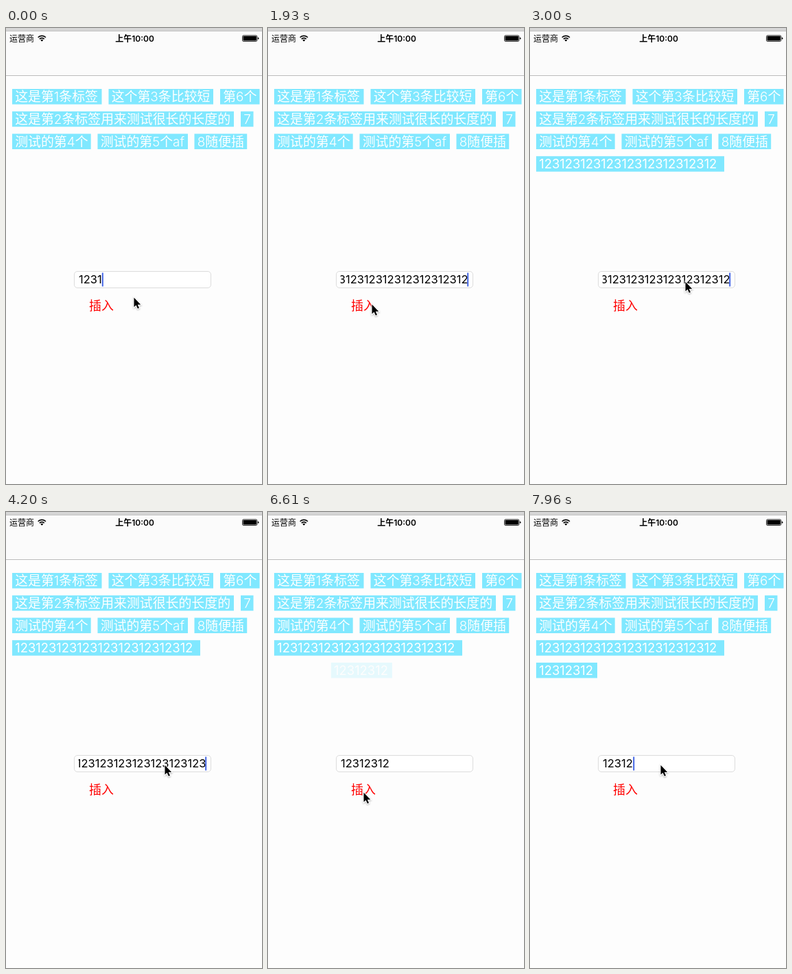
Animation, 373 px wide and 666 px high, one loop 8000 ms. Source, as an HTML page:

```html
<!DOCTYPE html>
<html lang="zh-CN">
<head>
<meta charset="utf-8">
<style>
html, body { margin: 0; width: 100%; height: 100%; overflow: hidden; background: #fdfdfd; }
svg { display: block; width: 373px; height: 666px; font-family: Inter, "Noto Sans CJK SC", "Noto Sans CJK", sans-serif; }
text { white-space: pre; }
.tag rect { fill: #80e8ff; }
.tag text { fill: #fff; font-size: 18.9px; font-weight: 300; }
.tag .digits { font-size: 18.4px; font-weight: 400; }
</style>
</head>
<body>
<svg viewBox="0 0 373 666">
  <defs>
    <clipPath id="fieldClip"><rect x="105.7" y="356" width="187" height="23"/></clipPath>
    <filter id="shadow" x="-50%" y="-50%" width="200%" height="200%">
      <feDropShadow dx="0" dy="1" stdDeviation="0.9" flood-color="#000" flood-opacity="0.35"/>
    </filter>
  </defs>
  <rect width="373" height="666" fill="#fdfdfd"/>
  <rect width="373" height="69" fill="#fbfbfb"/>
  <rect width="373" height="4" fill="#d6d6d6"/>
  <rect y="4" width="373" height="1" fill="#c2c2c2"/>
  <rect y="69" width="373" height="1" fill="#bcbcbc"/>

  <text x="5" y="19.5" font-size="12">运营商</text>
  <g fill="none" stroke="#000" stroke-width="1.7">
    <path d="M46.7 13.8A7.6 7.6 0 0 1 57.9 13.8"/>
    <path d="M48.9 16.1A4.6 4.6 0 0 1 55.7 16.1"/>
  </g>
  <path d="M52.3 19.7L50.3 17.6A2.9 2.9 0 0 1 54.3 17.6Z"/>
  <text x="187.5" y="19.5" font-size="12" font-weight="600" text-anchor="middle">上午10:00</text>
  <rect x="344.5" y="10.9" width="21.4" height="8.6" rx="1.6" fill="none" stroke="#000" stroke-width=".8"/>
  <rect x="345.5" y="11.8" width="19.4" height="6.8" rx=".8"/>
  <path d="M366.8 13.6Q368.4 13.9 368.4 15.2T366.8 16.8Z"/>

  <g id="tags"></g>

  <rect x="99.5" y="355.5" width="199" height="24" rx="4.5" fill="#fff" stroke="#dcdcdc"/>
  <g clip-path="url(#fieldClip)"><text id="typed" y="373" font-size="16.5"></text></g>
  <rect id="caret" y="357.5" width="2" height="20" fill="#4466e4"/>
  <text x="121" y="411.5" font-size="17.9" font-weight="350" fill="#f00">插入</text>

  <path id="pointer" filter="url(#shadow)" stroke="#fff" stroke-width="1.8" paint-order="stroke"
    d="M.5 .8V14.6L3.6 11.7L5.8 16.8L8 15.9L5.8 10.9H10.2Z"/>
</svg>
<script>
const LOOP = 8000;
const $ = id => document.getElementById(id);
const digits = n => '123'.repeat(9).slice(0, n);
const digitsWidth = n => Math.floor(n / 3) * 27.9 + [0, 6.7, 17.1][n % 3];
const clamp = v => Math.max(0, Math.min(1, v));
const ease = v => v * v * (3 - 2 * v);

function addTag(row, x, width, label) {
  const y = 89 + row * 32.75;
  const kind = /^\d{2,}$/.test(label) ? 'digits' : '';
  $('tags').insertAdjacentHTML('beforeend',
    `<g class="tag"><rect x="${x}" y="${y}" width="${width}" height="22.5"/>` +
    `<text class="${kind}" x="${x + 4.2}" y="${y + 18}">${label}</text></g>`);
  return $('tags').lastElementChild;
}

addTag(0, 9, 130.5, '这是第1条标签');
addTag(0, 149.5, 152.5, '这个第3条比较短');
addTag(0, 312, 57.5, '第6个');
addTag(1, 9, 323, '这是第2条标签用来测试很长的长度的');
addTag(1, 342, 18.5, '7');
addTag(2, 9, 114.7, '测试的第4个');
addTag(2, 133.5, 131.5, '测试的第5个af');
addTag(2, 274.5, 76.7, '8随便插');

// Inserted tags slide in from the right while fading in.
const inserted = [
  { el: addTag(3, 9, 274, digits(26)), start: 2185, shown: 2260, span: 250, shift: 10 },
  { el: addTag(4, 9, 89, digits(8)), start: 6530, shown: 6610, span: 300, shift: 101 },
];

// Key presses: first time, last time, length after the first, length after the last.
const keyRuns = [
  [60, 820, 5, 14], [880, 1300, 15, 20], [1350, 1350, 21, 21], [1530, 1930, 22, 26],
  [3760, 3760, 25, 25], [4110, 4880, 24, 16], [5000, 5680, 15, 8],
  [7670, 7810, 7, 6], [7960, 7960, 5, 5],
];

function typedLength(t) {
  let length = 4;
  for (const [from, to, first, last] of keyRuns) {
    if (t < from) break;
    const steps = Math.abs(last - first);
    const done = steps ? Math.floor(clamp((t - from) / (to - from)) * steps + 1e-6) : 0;
    length = first + Math.sign(last - first) * done;
  }
  return length;
}

// Caret pauses: fade-out start, fade-in end, fade-in time.
const blinks = [[2270, 2810, 120], [3290, 3760, 0], [6180, 6770, 120], [7180, 7670, 0]];

function caretOpacity(t) {
  const blink = blinks.find(([off, on]) => t >= off && t < on);
  if (!blink) return 1;
  const [off, on, fade] = blink;
  return Math.max(1 - clamp((t - off) / 120), fade ? clamp(1 - (on - t) / fade) : 0);
}

// Pointer moves: start, end, x, y.
const moves = [
  [60, 760, 162, 400], [880, 1250, 160, 401], [1530, 1930, 151, 403], [2580, 3000, 226, 370],
  [3290, 3410, 231, 369], [6130, 6410, 139, 409], [6800, 7350, 190, 369],
];

function pointerAt(t) {
  let x = 186, y = 393;
  for (const [from, to, nextX, nextY] of moves) {
    const p = ease(clamp((t - from) / (to - from)));
    x += (nextX - x) * p;
    y += (nextY - y) * p;
  }
  return [x, y];
}

function render(t) {
  const length = typedLength(t);
  const scrolled = length > 20;
  const typed = $('typed');
  typed.textContent = digits(length);
  typed.setAttribute('x', scrolled ? 291.5 : 106);
  typed.setAttribute('text-anchor', scrolled ? 'end' : 'start');

  $('caret').setAttribute('x', Math.min(106 + digitsWidth(length), 291) - 0.8);
  $('caret').setAttribute('opacity', caretOpacity(t));

  for (const { el, start, shown, span, shift } of inserted) {
    const p = ease(clamp((t - start) / span));
    el.setAttribute('opacity', t < shown ? 0 : p);
    el.setAttribute('transform', `translate(${shift * (1 - p)} 0)`);
  }

  $('pointer').setAttribute('transform', `translate(${pointerAt(t)})`);
}

const begin = performance.now();
function tick() {
  render((performance.now() - begin) % LOOP);
  requestAnimationFrame(tick);
}
tick();
</script>
</body>
</html>
```
